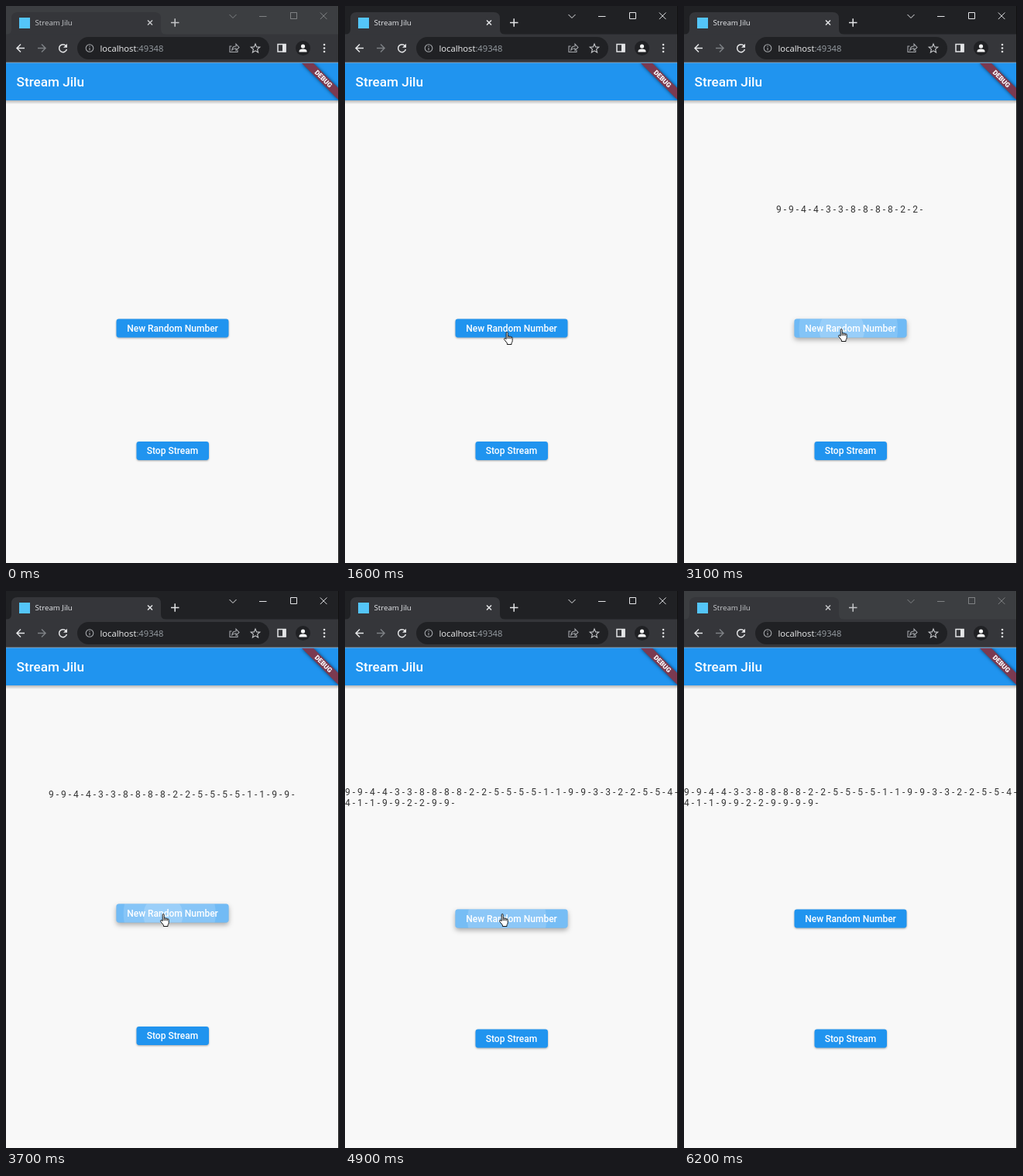
Animation of 430x720 px, one loop 6.3 s. Source, as an HTML page:

```html
<!DOCTYPE html>
<html lang="en">
<head>
<meta charset="utf-8">
<title>Stream Jilu</title>
<style>
html, body { margin: 0; width: 100%; height: 100%; overflow: hidden; background: #f8f8f8; }
svg { display: block; width: 430px; height: 720px; }
text { font-family: Roboto, sans-serif; white-space: pre; }
.ui { font-family: "Open Sans", sans-serif; }
.label { font-size: 12px; font-weight: 500; fill: #fff; text-anchor: middle; }
.line { fill: none; stroke: #e4e5e7; stroke-width: 1.5; }
.flat { filter: drop-shadow(0 1px 1px rgba(0,0,0,.32)); }
</style>
</head>
<body>
<svg viewBox="0 0 430 720">
  <defs>
    <linearGradient id="shade" x2="0" y2="1">
      <stop stop-color="#000" stop-opacity=".26"/>
      <stop offset="1" stop-color="#000" stop-opacity="0"/>
    </linearGradient>
    <clipPath id="face"><rect x="142.5" y="404.5" width="145" height="24" rx="3.4"/></clipPath>
    <clipPath id="corner"><rect x="370" y="74" width="60" height="60"/></clipPath>
  </defs>
  <rect width="430" height="720" fill="#f8f8f8"/>

  <!-- title bar -->
  <rect id="frame" width="430" height="37" fill="#202124"/>
  <path d="M0 37q7 0 7-7V16q0-8 8-8H192q8 0 8 8V30q0 7 7 7z" fill="#35363a"/>
  <rect x="17" y="15" width="14" height="14" fill="#54c5f8"/>
  <g id="tab">
    <text class="ui" x="37.5" y="25" font-size="9.7" fill="#e8eaed">Stream Jilu</text>
    <path class="line" d="M183 18.5l6 6m0-6l-6 6" stroke-width="1.2"/>
    <path class="line" d="M213 21.5h10.5M218.2 16.2v10.5" stroke-width="1.7"/>
  </g>
  <path id="winkeys" class="line" style="stroke-width:1" d="M288.5 11l4.5 4.5 4.5-4.5M327 13.5h9.5M367.5 8.5h8v8h-8zM405.8 8.5l8.6 8.6m0-8.6l-8.6 8.6"/>

  <!-- toolbar -->
  <rect y="36.5" width="430" height="36" fill="#35363a"/>
  <rect y="72" width="430" height="1.5" fill="#55585c"/>
  <path class="line" d="M24 54.5H14m5-5l-5 5 5 5"/>
  <path class="line" d="M41 54.5h10m-5-5l5 5-5 5" style="stroke:#7d8084"/>
  <path class="line" d="M77.4 51.4A5 5 0 1 0 78.4 56"/>
  <path d="M79 48.8v5h-5z" fill="#e4e5e7"/>
  <rect x="92" y="40" width="248" height="29" rx="14.5" fill="#202124"/>
  <g class="line" style="stroke:#a4a7ab;stroke-width:1.1">
    <circle cx="108" cy="54.5" r="4.8"/>
    <path d="M108 54v3.2M108 51.6v1.2"/>
    <path d="M291.5 52h-2.5v7.5h10V57M291.8 57q.5-5 5.2-5v-2.8l4 4.2-4 4v-2.7q-3.5 0-5.2 2.3z"/>
    <path d="M322 49l1.6 3.9 4.2.3-3.2 2.7 1 4.1-3.6-2.2-3.6 2.2 1-4.1-3.2-2.7 4.2-.3z" stroke="#c4c6c9"/>
  </g>
  <text class="ui" x="121.5" y="58.6" font-size="11.2" fill="#f0f1f2">localhost<tspan fill="#9aa0a6">:49348</tspan></text>
  <path class="line" d="M351 49.5h10v9.5h-10z"/>
  <path d="M357 49h4.5v10.5H357z" fill="#e4e5e7"/>
  <circle cx="383.5" cy="54.5" r="9.5" fill="#202124"/>
  <path d="M378.5 59.5v-1q0-3 5-3t5 3v1z" fill="#f4f4f4"/>
  <circle cx="383.5" cy="52" r="2.6" fill="#f4f4f4"/>
  <g fill="#e4e5e7"><circle cx="411" cy="50" r="1.3"/><circle cx="411" cy="54.5" r="1.3"/><circle cx="411" cy="59" r="1.3"/></g>

  <!-- app bar -->
  <rect y="122" width="430" height="5" fill="url(#shade)"/>
  <rect y="73.5" width="430" height="48.5" fill="#2094ef"/>
  <text x="13.6" y="104" font-size="17.14" font-weight="500" fill="#fff">Stream Jilu</text>
  <g clip-path="url(#corner)">
    <path d="M382 74h15l33 33v15z" fill="#7b3a50" style="filter:drop-shadow(0 0 2px rgba(0,0,0,.6))"/>
    <text transform="translate(410 94) rotate(45)" y="3.1" font-size="8.7" font-weight="900" fill="#fff" text-anchor="middle">DEBUG</text>
  </g>

  <!-- body -->
  <g font-size="12" fill="#333"><text id="row1"/><text id="row2" y="278"/></g>
  <g id="add">
    <rect id="addFace" x="142.5" y="404.5" width="145" height="24" rx="3.4" fill="#2094ef"/>
    <g clip-path="url(#face)" fill="#fff">
      <rect id="glow" x="142" y="404" width="146" height="25"/>
      <g id="ripples"></g>
    </g>
    <text class="label" x="215" y="420.8">New Random Number</text>
  </g>
  <g id="stop">
    <rect class="flat" x="168.5" y="563" width="93.5" height="24" rx="3.4" fill="#2094ef"/>
    <text class="label" x="215" y="579.3">Stop Stream</text>
  </g>
  <rect x="429" y="0" width="1" height="720" fill="#111"/>

  <g id="cursor" stroke="#000" stroke-width=".9" fill="#fff" stroke-linejoin="round">
    <path id="arrow" d="M.5.5v15.6l3.6-3.4 2.3 5.4 2.3-1-2.3-5.2h4.9z"/>
    <path id="hand" d="M3.2 9.6V1.6q0-1.1 1-1.1t1 1.1V6q1.2-.8 2 .3 1.3-.6 2 .5 2-.4 2 1.3v3.4q0 2-1.2 3.2v1.8H4.4v-1.6L.8 10.3Q.1 9 1.1 8.5q.8-.3 2.1 1.1zM5.2 6v3.2M7.2 6.3v2.9M9.2 6.8v2.6"/>
  </g>
</svg>
<script>
const $ = id => document.getElementById(id);
const LOOP = 6300, TICK = 100, CLICKS = 19, PER_ROW = 27;
const digits = "9438825519325419299";
const pressAt = n => 2443 + 154.5 * (n - 2);
const countAt = n => 2135 + 162 * n;
const path = [
  [100, 292, 425], [400, 300, 500], [700, 290, 561], [1000, 262, 610],
  [1300, 235, 540], [1500, 214, 462], [1600, 205, 421], [1900, 201, 418],
  [2100, 199, 417], [5050, 199, 417], [5200, 214, 470], [5400, 266, 607],
  [5500, 295, 661]
];

const clamp = v => Math.min(1, Math.max(0, v));
const mix = (a, b, p) => a + (b - a) * p;
const ramp = (t, from, to) => clamp((t - from) / (to - from));
const move = (el, x, y) => el.setAttribute("transform", `translate(${x} ${y})`);
const show = (el, on) => el.setAttribute("visibility", on ? "visible" : "hidden");

const rings = Array.from({ length: CLICKS }, () => {
  const c = document.createElementNS("http://www.w3.org/2000/svg", "circle");
  return $("ripples").appendChild(c);
});

function drawChrome(t) {
  const focused = t >= 1000 && t < 6200;
  $("frame").setAttribute("fill", focused ? "#202124" : "#3c3e41");
  $("tab").setAttribute("opacity", focused ? 1 : 0.82);
  $("winkeys").setAttribute("opacity", focused ? 1 : 0.4);
}

function drawNumbers(t) {
  let n = 0;
  while (n < CLICKS && t >= countAt(n)) n++;
  const items = [...digits.slice(0, n)].flatMap(d => [d + " - ", d + " - "]);
  const wraps = items.length > PER_ROW;
  $("row1").setAttribute("x", wraps ? 0 : 215 - items.length * 8);
  $("row1").setAttribute("y", wraps ? 264 : 267.4);
  $("row1").textContent = items.slice(0, PER_ROW).join("");
  $("row2").textContent = items.slice(PER_ROW).join("");
  move($("add"), 0, wraps ? 7 : 0);
  move($("stop"), 0, wraps ? 3.5 : 0);
}

function drawButton(t) {
  const press = ramp(t, pressAt(0), pressAt(0) + 200) * (1 - ramp(t, 5100, 5600));
  const hover = ramp(t, 1600, 1650) * (1 - ramp(t, 5200, 5500));
  $("glow").setAttribute("opacity", 0.02 * hover + 0.27 * press);
  $("addFace").style.filter =
    `drop-shadow(0 ${1 + 2 * press}px ${1 + 2 * press}px rgba(0,0,0,.32))`;
  rings.forEach((ring, n) => {
    const age = t - pressAt(n);
    const p = clamp(age / 240) ** 1.1;
    const fade = 1 - ramp(t, pressAt(n) + 110, pressAt(n) + 540);
    ring.setAttribute("cx", mix(202, 215, p));
    ring.setAttribute("cy", mix(419, 416.5, p));
    ring.setAttribute("r", mix(22, 75, p));
    ring.setAttribute("opacity", age < 0 ? 0 : 0.17 * fade);
  });
}

function drawCursor(t) {
  let i = 0;
  while (i < path.length - 2 && t >= path[i + 1][0]) i++;
  const [t0, x0, y0] = path[i], [t1, x1, y1] = path[i + 1];
  const p = ramp(t, t0, t1);
  const on = t >= 100 && t < 5700, hand = t >= 1600 && t <= 5400;
  move($("cursor"), mix(x0, x1, p), mix(y0, y1, p));
  show($("hand"), on && hand);
  show($("arrow"), on && !hand);
}

function draw(ms) {
  const t = Math.floor((ms % LOOP) / TICK) * TICK;
  drawChrome(t);
  drawNumbers(t);
  drawButton(t);
  drawCursor(t);
}

let start;
function loop(now) {
  start ??= now;
  draw(Math.max(0, now - start));
  requestAnimationFrame(loop);
}
draw(0);
requestAnimationFrame(loop);
</script>
</body>
</html>
```
